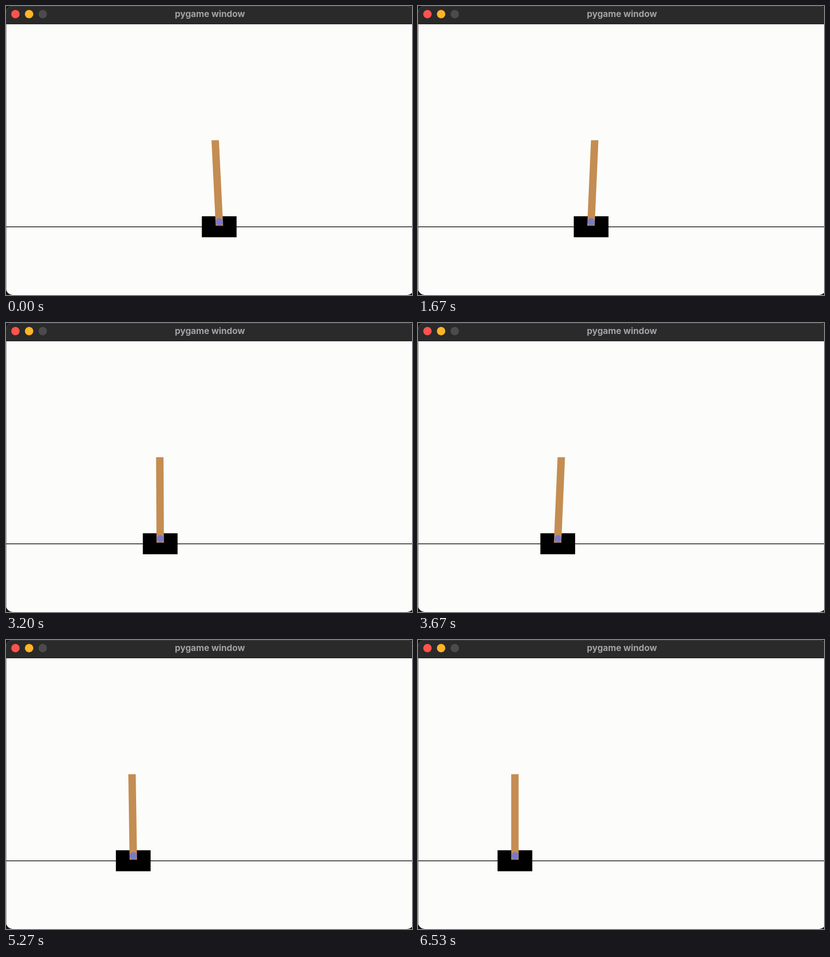
Animation, 886 px wide and 632 px high, one loop 6590 ms. Source, as an HTML page:

```html
<!DOCTYPE html>
<html lang="en">
<head>
<meta charset="utf-8">
<title>Cart and pole</title>
<style>
html, body { margin: 0; width: 100%; height: 100%; overflow: hidden; background: #161616; }
svg { display: block; }
text { font: 700 19.2px Inter, "Open Sans", sans-serif; fill: #a3a2a5; text-anchor: middle; }
</style>
</head>
<body>
<svg width="886" height="632" viewBox="0 0 886 632">
  <defs><clipPath id="win"><rect width="890" height="632" rx="15"/></clipPath></defs>
  <g clip-path="url(#win)">
    <rect width="886" height="632" fill="#fcfcfa"/>
    <rect width="886" height="39.7" fill="#2a2a2a"/>
    <rect y="38.4" width="886" height="1.3" fill="#171717"/>
    <rect width="886" height="1" fill="#454545"/>
    <rect y="39" width="1" height="593" fill="#777"/>
  </g>
  <circle cx="20.6" cy="17.8" r="9.2" fill="#ff534d"/>
  <circle cx="50.4" cy="17.8" r="9.2" fill="#ffb429"/>
  <circle cx="80.2" cy="17.8" r="9.2" fill="#4b4b4b"/>
  <text x="445" y="24">pygame window</text>
  <path d="M0 482.9H886" stroke="#222" stroke-width="1.7"/>
  <g id="cart">
    <rect x="-37.9" y="459.8" width="75.8" height="45.9"/>
    <path id="pole" fill="#c48d52"/>
    <circle cx="0.2" cy="472" r="8" fill="#7b79c6"/>
  </g>
</svg>
<script>
const LOOP = 6590, AXLE = 472, TOP = 293.6, BOTTOM = 480.5, HALF = 8.1;

// Key poses: [time in ms, cart centre, sideways offset of the pole tip]
const poses = [
  [0, 465.3, -8.8], [1670, 377.8, 7.8], [2730, 367.3, -8.8], [3670, 305, 7.7],
  [4600, 293.2, -3], [5330, 275.6, -2.5], [5870, 247, 0], [6530, 211.5, 0]
];

// Smooth curve through one column of the key poses
function curve(column, t) {
  const last = poses.length - 1;
  const i = Math.max(0, poses.findIndex(p => p[0] >= t) - 1);
  const slope = k => {
    const a = poses[Math.max(k - 1, 0)], b = poses[Math.min(k + 1, last)];
    return (b[column] - a[column]) / (b[0] - a[0]);
  };
  const from = poses[i], to = poses[i + 1];
  const h = to[0] - from[0], u = (t - from[0]) / h, v = 1 - u;
  return v * v * ((1 + 2 * u) * from[column] + u * h * slope(i))
       + u * u * ((1 + 2 * v) * to[column] - v * h * slope(i + 1));
}

// Picture steps come 15 times a second, on a 10 ms clock
function stepTime(t) {
  const start = n => Math.round(n * 20 / 3) * 10;
  const n = Math.floor(t * 0.015 + 0.1);
  return start(start(n) > t ? n - 1 : n);
}

const cart = document.getElementById("cart");
const pole = document.getElementById("pole");

function draw(now) {
  const t = stepTime(now % LOOP);
  const tip = curve(2, t);
  const foot = -tip * (BOTTOM - AXLE) / (AXLE - TOP);
  cart.setAttribute("transform", `translate(${curve(1, t)})`);
  pole.setAttribute("d",
    `M${tip - HALF} ${TOP}H${tip + HALF}L${foot + HALF} ${BOTTOM}H${foot - HALF}Z`);
}

const began = performance.now();
function tick() {
  draw(performance.now() - began);
  requestAnimationFrame(tick);
}
tick();
</script>
</body>
</html>
```
